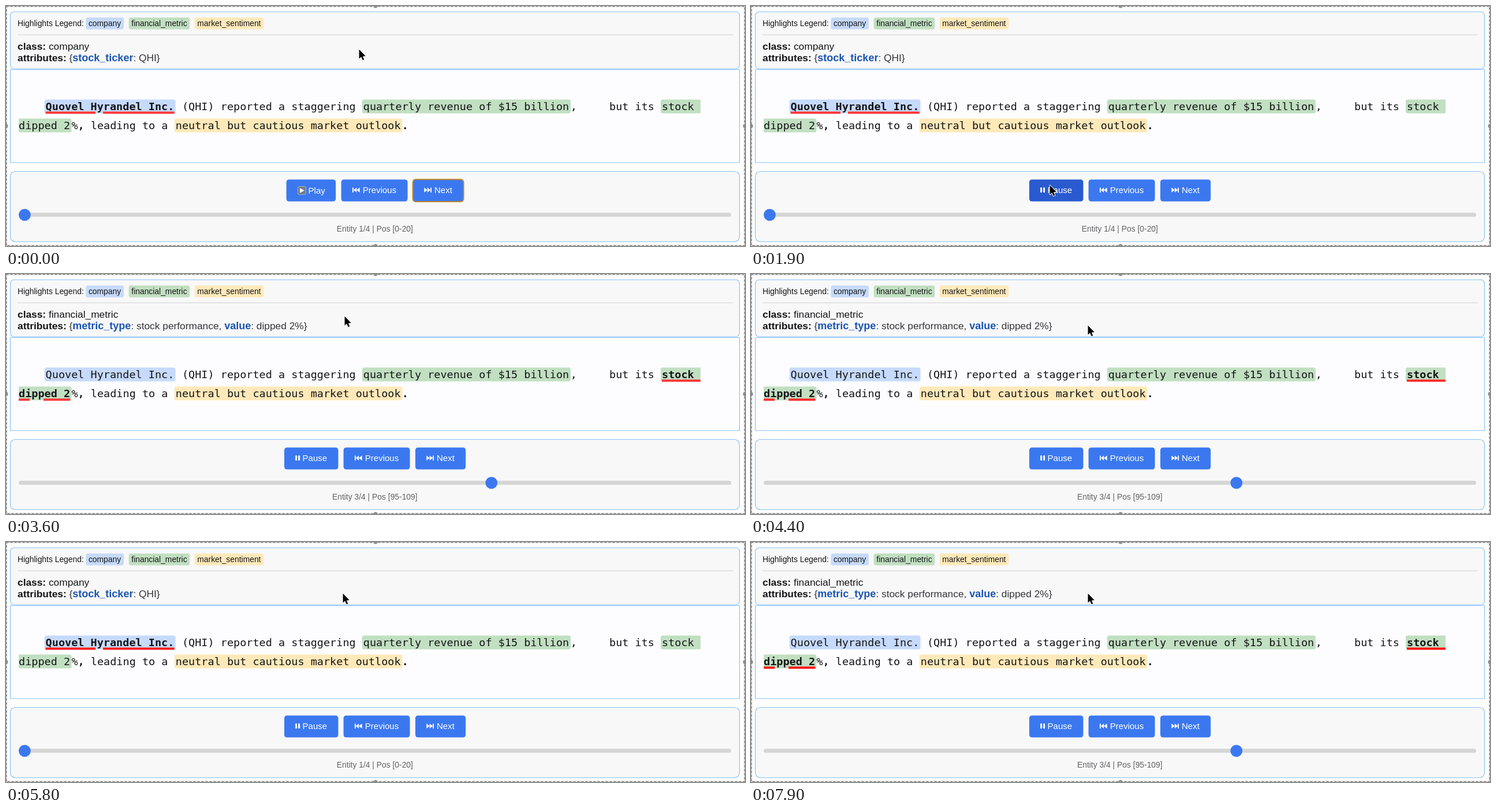
Write an HTML page with a canvas that moves like this. It is 1280x417 px and loops after 8000 ms.

```html
<!DOCTYPE html>
<html lang="en">
<head>
<meta charset="utf-8">
<title>Entity highlights</title>
<style>
  html, body { margin: 0; width: 100%; height: 100%; overflow: hidden; background: #fff; }
  canvas { display: block; width: 1280px; height: 417px; }
</style>
</head>
<body>
<canvas id="stage" width="1280" height="417"></canvas>
<script>
const ctx = document.getElementById('stage').getContext('2d');

const LOOP = 8000, PLAY_AT = 1560, STEP = 1000;
const SANS = '"Liberation Sans", Arial, sans-serif';
const MONO = '"DejaVu Sans Mono", monospace';
const CHAR = 11.14;
const BLUE = '#c6dafb', GREEN = '#c1dfc1', YELLOW = '#ffe9b9';
const INK = '#151518';
const TICKER = 'QHI';

const entities = [
  { cls: 'company', attrs: [['stock_ticker', TICKER]], pos: '0-20' },
  { cls: 'financial_metric', attrs: [['metric_type', 'revenue'], ['value', '$15 billion']], pos: '49-81' },
  { cls: 'financial_metric', attrs: [['metric_type', 'stock performance'], ['value', 'dipped 2%']], pos: '95-109' },
  { cls: 'market_sentiment', attrs: [['sentiment', 'neutral']], pos: '125-160' }
];

// Highlighted runs: box edges, text start, corner radii and underline segments
const marks = [
  { id: 0, text: 'Quovel Hyrandel Inc.', x: 68.6, row: 0, box: [66.6, 293.6], r: 3.5, color: BLUE,
    lines: [[68.6, 155], [168, 291.6]] },
  { id: 1, text: 'quarterly revenue of $15 billion', x: 618.8, row: 0, box: [616.8, 978], r: 3.5, color: GREEN,
    lines: [[618.8, 622], [632, 705], [718, 853], [864, 975.5]] },
  { id: 2, text: 'stock', x: 1136, row: 0, box: [1134, 1203], r: [3.5, 0, 0, 3.5], color: GREEN,
    lines: [[1136, 1203]] },
  { id: 2, text: 'dipped 2', x: 22, row: 1, box: [22, 113.5], r: [0, 3.5, 3.5, 0], color: GREEN,
    lines: [[22, 41], [65, 111.2]] },
  { id: 3, text: 'neutral but cautious market outlook', x: 293.8, row: 1, box: [291.8, 686.5], r: 3.5, color: YELLOW,
    lines: [[293.8, 684]] }
];

const cursorKeys = [
  [0, 611, 75], [200, 613, 80], [600, 690, 270], [850, 735, 396], [1000, 738, 328],
  [1100, 614, 323], [1350, 525, 314], [1560, 518, 311], [2000, 517, 311],
  [2700, 575, 2], [3300, 586, 66], [3600, 586, 73], [3750, 586, 73], [4200, 583, 89]
];

const clamp = v => Math.max(0, Math.min(1, v));
const smooth = v => v * v * (3 - 2 * v);
const mix = (a, b, k) => a + (b - a) * k;

function box(x, y, w, h, r, fill, stroke, width = 1.15) {
  ctx.beginPath();
  ctx.roundRect(x, y, w, h, r);
  if (fill) { ctx.fillStyle = fill; ctx.fill(); }
  if (stroke) { ctx.strokeStyle = stroke; ctx.lineWidth = width; ctx.stroke(); }
}

function poly(points, fill) {
  ctx.beginPath();
  points.forEach(([x, y]) => ctx.lineTo(x, y));
  ctx.closePath();
  ctx.fillStyle = fill;
  ctx.fill();
}

// Draws text and returns the x where it ends
function text(str, x, y, size, color, { bold = false, family = SANS } = {}) {
  ctx.font = `${bold ? 'bold ' : ''}${size}px ${family}`;
  ctx.fillStyle = color;
  ctx.fillText(str, x, y);
  return x + ctx.measureText(str).width;
}

function selectionFrame() {
  ctx.strokeStyle = '#d6d6d6';
  ctx.lineWidth = 2;
  ctx.strokeRect(0.5, 0.5, 1279, 416);
  ctx.strokeStyle = '#858585';
  ctx.setLineDash([4, 3]);
  ctx.strokeRect(0.5, 0.5, 1279, 416);
  ctx.setLineDash([]);
  for (const [x, y] of [[640, 0], [640, 417], [0, 208.5], [1280, 208.5]]) {
    ctx.beginPath();
    ctx.arc(x, y, 3.5, 0, 7);
    ctx.fillStyle = '#8c8c8c';
    ctx.fill();
  }
}

function infoPanel(entity) {
  box(7.5, 10, 1263, 99, 6.5, '#f8f8f8', '#86c1f8');
  text('Highlights Legend:', 20, 35, 13.87, INK);
  for (const [label, x, w, color] of [
    ['company', 138.3, 65.7, BLUE],
    ['financial_metric', 212.7, 105.5, GREEN],
    ['market_sentiment', 326.7, 119.6, YELLOW]
  ]) {
    box(x, 20, w, 20.5, 3.5, color);
    text(label, x + 4.6, 35, 13.87, INK);
  }
  ctx.fillStyle = '#d5d5d5';
  ctx.fillRect(20, 49.5, 1239, 1.1);

  const size = 17.34, grey = '#35353a', gap = 4.82;
  let x = text('class:', 20, 76, size, INK, { bold: true });
  text(entity.cls, x + gap, 76, size, INK);
  x = text('attributes:', 20, 95.5, size, INK, { bold: true });
  x = text('{', x + gap, 95.5, size, grey);
  entity.attrs.forEach(([key, value], i) => {
    if (i) x = text(', ', x, 95.5, size, grey);
    x = text(key, x, 95.5, 18, '#1a55b3', { bold: true });
    x = text(': ' + value, x, 95.5, size, grey);
  });
  text('}', x, 95.5, size, grey);
}

function passage(active, lineColor) {
  box(7.5, 110.5, 1263, 161.5, 0, '#fdfdff', '#86c1f8');
  const mono = (str, x, row, bold) =>
    text(str, x, 181 + row * 33, 18.5, INK, { bold, family: MONO });

  for (const m of marks) {
    const on = m.id === active;
    const top = 162.6 + m.row * 33;
    box(m.box[0], top, m.box[1] - m.box[0], 24, m.r, m.color);
    if (on) {
      ctx.fillStyle = lineColor;
      for (const [a, b] of m.lines) ctx.fillRect(a, top + 20.8, b - a, 3.9);
    }
    mono(m.text, m.x, m.row, on);
  }
  mono(`(${TICKER}) reported a staggering`, 293.8 + CHAR, 0);
  mono(',', 977.8, 0);
  mono('but its', 1045, 0);
  mono('%', 113.4, 1);
  mono(',', 113.4 + CHAR, 1, true);
  mono('leading to a', 113.4 + 3 * CHAR, 1);
  mono('.', 685.8, 1, true);
}

// Skip icon: dir -1 points back, 1 points forward
function skipIcon(cx, cy, dir) {
  for (const off of [-6, -0.6])
    poly([[cx + dir * off, cy - 4.2], [cx + dir * (off + 5.4), cy], [cx + dir * off, cy + 4.2]], '#fff');
  ctx.fillRect(cx + dir * 5.7 - 0.9, cy - 4.2, 1.8, 8.4);
}

function hover(t, from, to) {
  if (t < from) return 0;
  return clamp(clamp((Math.min(t, to) - from) / 200) - Math.max(0, t - to) / 200);
}

function button(x, w, level) {
  const color = `rgb(${mix(59, 42, level)},${mix(120, 90, level)},${mix(240, 208, level)})`;
  box(x, 301.5, w, 38, 4.6, color);
}

function controls(t, index) {
  const playing = t >= PLAY_AT;
  box(7.5, 287.5, 1263, 122, 8.5, '#f8f8f8', '#86c1f8');

  const shift = playing ? 4 : 0;
  const label = (str, x, y = 325) => text(str, x, y, 15.03, '#fff');

  button(playing ? 482 : 485.6, playing ? 93.5 : 85.6, hover(t, 1270, 2130));
  if (playing) {
    ctx.fillStyle = '#fff';
    ctx.fillRect(501.2, 315.4, 2.9, 8.6);
    ctx.fillRect(506.2, 315.4, 2.9, 8.6);
    label('Pause', 513.6);
  } else {
    box(505.4, 313.6, 14, 14, 2.4, '#737e8d', '#a9b4c2', 0.9);
    poly([[509, 316.4], [516.8, 320.6], [509, 324.8]], '#fff');
    label('Play', 523.6, 326);
  }

  button(580.6 + shift, 115, hover(t, 1010, 1240));
  skipIcon(606.6 + shift, 319.8, -1);
  label('Previous', 617.8 + shift);

  button(705 + shift, 87.2, hover(t, 900, 1050));
  if (!playing) box(704.6, 301.2, 88, 38.8, 5, null, '#c88a24', 2);
  skipIcon(730.4 + shift, 319.8, 1);
  label('Next', 742 + shift);

  box(22, 359.3, 1234, 7, 3.5, '#d5d5d5');
  ctx.beginPath();
  ctx.arc(32.4 + index * 404.2, 362.8, 10.4, 0, 7);
  ctx.fillStyle = '#3b78f0';
  ctx.fill();

  ctx.textAlign = 'center';
  text(`Entity ${index + 1}/4 | Pos [${entities[index].pos}]`, 638.8, 392, 13.87, '#626266');
  ctx.textAlign = 'left';
}

function cursorAt(t) {
  const next = cursorKeys.findIndex(k => k[0] > t);
  if (next < 0) return cursorKeys[cursorKeys.length - 1].slice(1);
  const a = cursorKeys[next - 1], b = cursorKeys[next];
  const k = smooth((t - a[0]) / (b[0] - a[0]));
  return [mix(a[1], b[1], k), mix(a[2], b[2], k)];
}

function cursor(t) {
  const [x, y] = cursorAt(t);
  const shape = [[0, 0], [0, 16], [3.6, 12.7], [6.1, 18.4], [8.7, 17.3], [6.3, 11.8], [11.2, 11.4]];
  ctx.save();
  ctx.translate(x + 0.6, y + 0.6);
  ctx.shadowColor = 'rgba(0,0,0,.3)';
  ctx.shadowBlur = 2;
  ctx.shadowOffsetY = 1;
  poly(shape, '#000');
  ctx.shadowColor = 'transparent';
  ctx.strokeStyle = '#fff';
  ctx.lineWidth = 2;
  ctx.lineJoin = 'round';
  ctx.stroke();
  poly(shape, '#000');
  ctx.restore();
}

function draw(now) {
  const t = now % LOOP;
  const steps = t < PLAY_AT ? 0 : Math.floor((t - PLAY_AT) / STEP);
  const index = steps % entities.length;

  // The underline pulses to pure red and back after each change
  const age = steps ? (t - PLAY_AT) % STEP / STEP : 0;
  const pulse = smooth(1 - Math.abs(2 * age - 1));
  const tint = Math.round(54 * (1 - pulse));

  ctx.fillStyle = '#fefefe';
  ctx.fillRect(0, 0, 1280, 417);
  selectionFrame();
  infoPanel(entities[index]);
  passage(index, `rgb(255,${tint},${tint})`);
  controls(t, index);
  cursor(t);
}

function tick() {
  draw(performance.now());
  requestAnimationFrame(tick);
}
tick();
</script>
</body>
</html>
```
